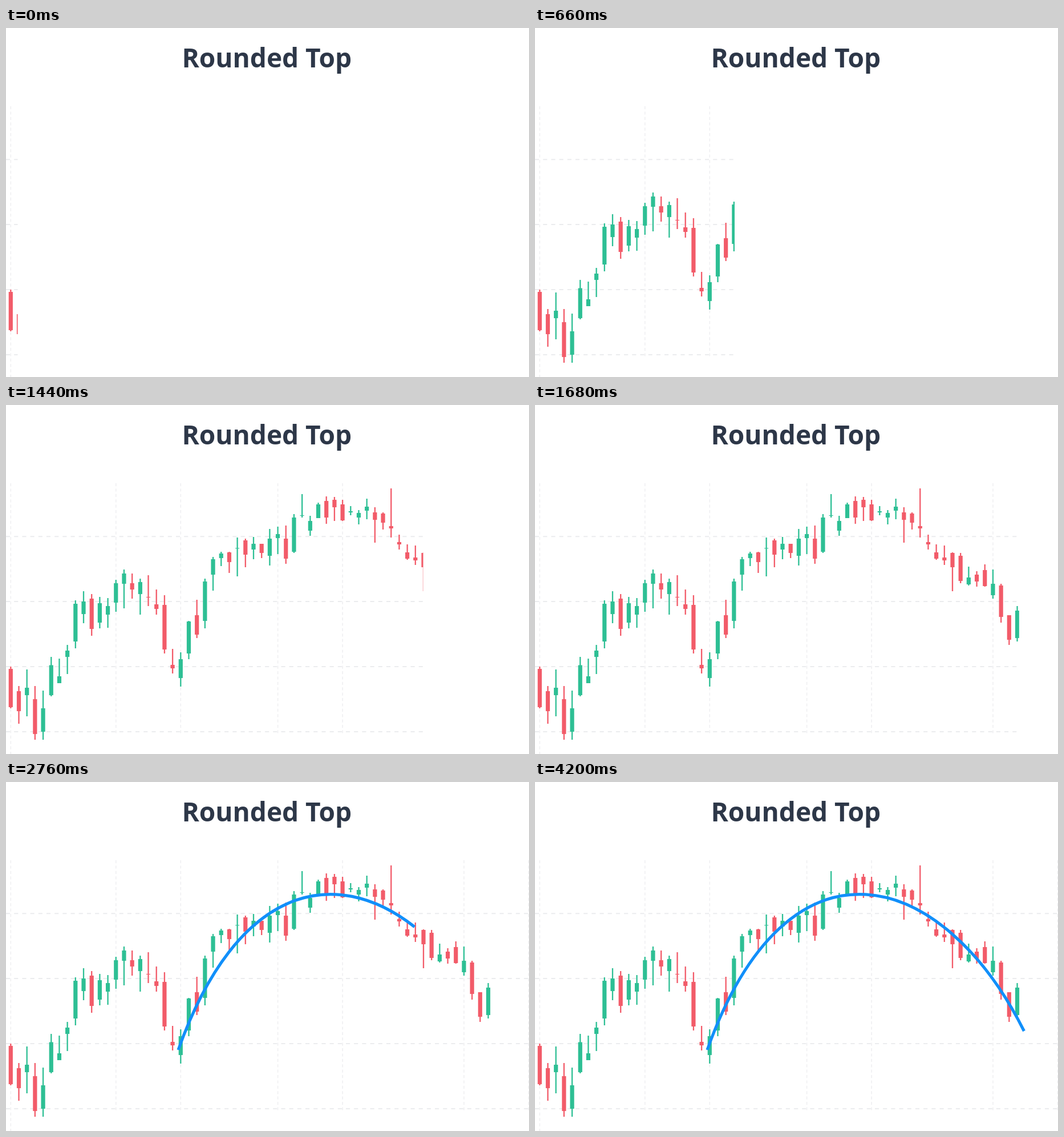
An HTML page that plays this animation: 917x611 px, repeating every 4380 ms.

```html
<!DOCTYPE html>
<html lang="en">
<head>
<meta charset="utf-8">
<title>Rounded Top</title>
<style>
  html, body { margin: 0; width: 100%; height: 100%; overflow: hidden; background: #fff; }
  svg { display: block; width: 917px; height: 611px; }
  .title { font: 700 46px "Open Sans", "Noto Sans", sans-serif; fill: #2d3748; text-anchor: middle; }
  .row { stroke: #ebecee; stroke-width: 2; stroke-dasharray: 7.1 7.09; }
  .col { stroke: #efeff1; stroke-width: 1.6; stroke-dasharray: 5.2 4.2; }
  .up { fill: #2dbf94; }
  .down { fill: #f25b69; }
  .arc { fill: none; stroke: #118ffa; stroke-width: 5.2; }
</style>
</head>
<body>
<svg viewBox="0 0 917 611">
  <defs><clipPath id="reveal"><rect id="edge" width="20.5" height="611"/></clipPath></defs>
  <text class="title" x="457.3" y="69">Rounded Top</text>
  <g id="chart" clip-path="url(#reveal)"></g>
  <path id="arc" class="arc" d="M302 469C444 71.4 715.5 152 857.5 436"/>
</svg>
<script>
const LOOP = 4380, TICK = 60;
const X0 = 8.3, STEP = 14.19;

// Candles as [high, open, close, low] in screen y
const rise = [
  [458, 462, 529, 531], [492, 501, 536, 558], [463, 508, 495, 545], [492, 515, 576, 586],
  [500, 572, 531, 586], [441, 508, 455.5, 510], [444, 487, 475, 487], [420, 441, 430, 471],
  [342, 414, 348, 426], [326, 366, 344, 382], [331, 339, 392, 404], [336, 381, 347, 391],
  [338, 367, 352, 390], [306, 346, 312, 362], [288, 313, 295, 356], [295, 312, 323, 339],
  [304, 331, 310, 367], [298, 336, 337, 352], [323, 349, 357, 367], [333, 350, 428, 435]
];
const climb = [
  [427, 455, 461, 470], [433, 478, 445, 493], [378, 435, 379, 445], [341, 368, 402, 408],
  [304, 378, 309, 391], [266, 297, 270, 325], [257, 268, 260, 282], [257, 258, 275, 294],
  [232, 251.4, 250.4, 300], [234, 237, 262, 284], [231, 253, 243, 270], [243, 243, 259, 268],
  [217, 264, 234, 281], [213, 233, 226, 261], [211, 234, 269, 278], [191, 257, 197, 259],
  [156, 194, 193, 197], [194, 220, 203, 229], [171, 198, 174, 198], [160, 168, 197, 208]
];
const fall = [
  [161, 166, 179, 203], [166, 174, 202, 203], [177, 188, 186, 193], [184, 197, 189, 209],
  [164, 185, 178, 200], [179, 188, 201, 241], [188, 190, 206, 218], [146, 212, 216, 232],
  [227, 240, 244, 253], [244, 258, 269, 271], [246, 267, 272, 280], [258, 259, 284, 326],
  [259, 264, 308, 312], [283, 314, 302, 316], [291, 297, 309, 318], [279, 289, 317, 318],
  [288, 333, 313, 339], [313, 316, 371, 381], [368, 368, 411, 420], [352, 408, 360, 414]
];

const $ = id => document.getElementById(id);
const chart = $("chart"), edge = $("edge"), arc = $("arc");

function add(tag, attrs) {
  const el = document.createElementNS("http://www.w3.org/2000/svg", tag);
  for (const k in attrs) el.setAttribute(k, attrs[k]);
  chart.append(el);
}

function bar(cls, x, width, top, bottom) {
  add("rect", { class: cls, x: x - width / 2, y: top, width, height: bottom - top });
}

for (const y of [230.2, 344.1, 458.1, 572])
  add("line", { class: "row", x1: 0, x2: 917, y1: y, y2: y });

for (const i of [0, 13, 21, 33, 41, 56, 64]) {
  const x = X0 + i * STEP;
  add("line", { class: "col", x1: x, x2: x, y1: 137, y2: i ? 576 : 611 });
}

[...rise, ...climb, ...fall].forEach(([high, open, close, low], i) => {
  const x = X0 + i * STEP, cls = close < open ? "up" : "down";
  bar(cls, x, 2.3, high, low);
  bar(cls, x, 7.2, Math.min(open, close), Math.max(open, close));
});

// Right edge of the visible chart: [ms, x]
const sweep = [[0, 20.5], [660, 350], [1080, 556], [1440, 731.3], [1860, 937]];

function lerpTable(table, t) {
  for (let i = 1; i < table.length; i++) {
    const [t0, a] = table[i - 1], [t1, b] = table[i];
    if (t <= t1) return a + (b - a) * (t - t0) / (t1 - t0);
  }
  return table[table.length - 1][1];
}

function ease(p, x1 = 0.32, y1 = 0.15, x2 = 0.32, y2 = 1) {
  if (p <= 0) return 0;
  if (p >= 1) return 1;
  const at = (u, a, b) => 3 * u * (1 - u) ** 2 * a + 3 * u * u * (1 - u) * b + u ** 3;
  let lo = 0, hi = 1;
  for (let i = 0; i < 24; i++) {
    const mid = (lo + hi) / 2;
    if (at(mid, x1, x2) < p) lo = mid; else hi = mid;
  }
  return at(lo, y1, y2);
}

const arcLen = arc.getTotalLength();

function draw(t) {
  edge.setAttribute("width", lerpTable(sweep, t));
  const p = ease((t - 2145) / 1340);
  arc.style.display = p ? "" : "none";
  arc.style.strokeDasharray = p < 1 ? `${p * arcLen} ${arcLen * 2}` : "none";
}

const start = performance.now();
function loop() {
  const t = (performance.now() - start) % LOOP;
  draw(Math.floor(t / TICK) * TICK);
  requestAnimationFrame(loop);
}
loop();
</script>
</body>
</html>
```
